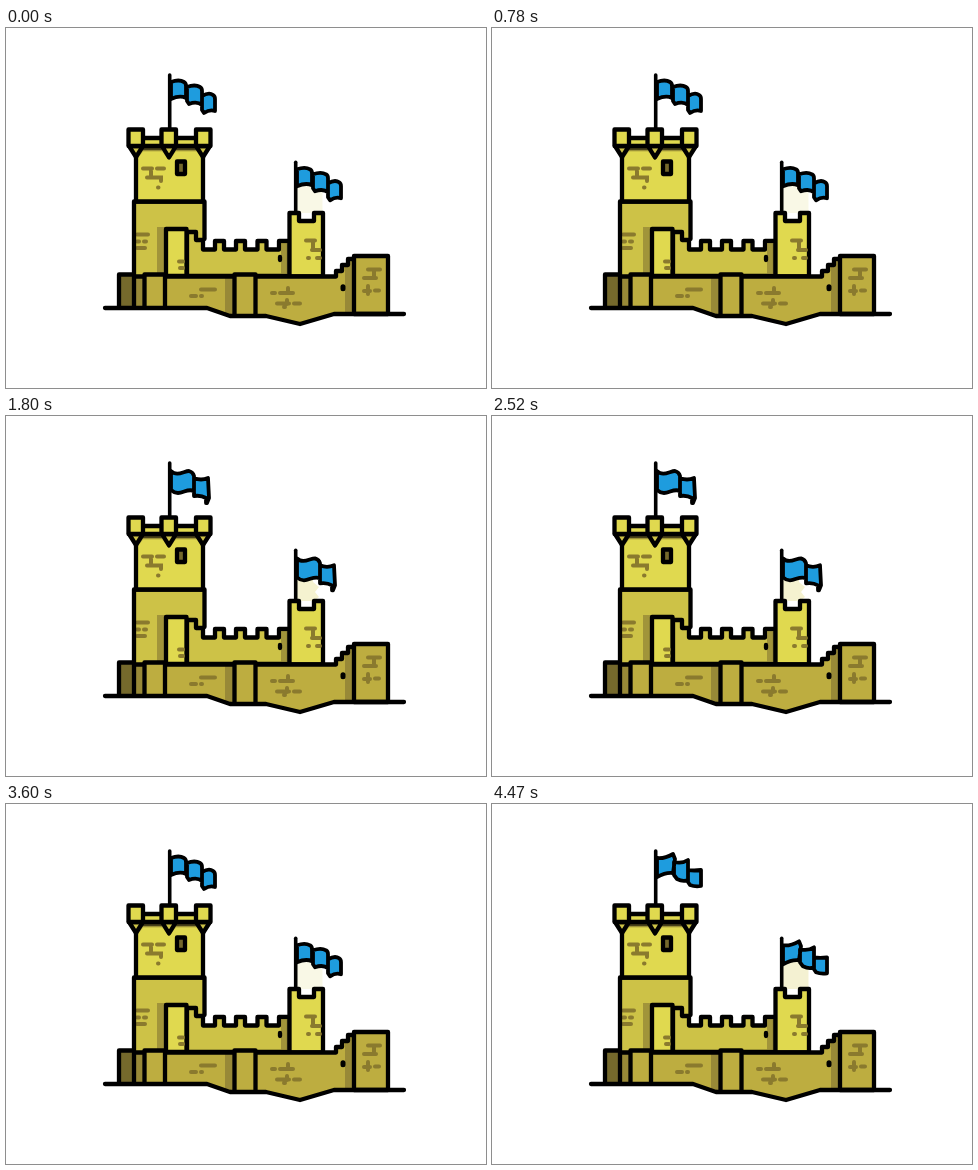
An HTML page for the animation above (4.5 s loop, 480 by 360 pixels).

```html
<!DOCTYPE html>
<html lang="en">
<head>
<meta charset="utf-8">
<title>Castle with waving flags</title>
<style>
  html, body { margin: 0; width: 100%; height: 100%; overflow: hidden; background: #fff; }
  svg { display: block; width: 480px; height: 360px; }
  .line { fill: none; stroke: #000; stroke-width: 4.3; stroke-linejoin: round; stroke-linecap: round; }
  .light { fill: #e0d94f; }
  .mid { fill: #cdc247; }
  .low { fill: #bdad40; }
  .shade { fill: #8f8135; }
  .dark { fill: #75692c; }
  .slit { stroke-width: 5; }
  .pole { stroke-width: 3.6; }
  .brick { fill: none; stroke: #8a7a2e; stroke-width: 4; stroke-linecap: round; }
  .flag { fill: #1e9cde; stroke: #000; stroke-width: 3.8; stroke-linejoin: round; }
</style>
</head>
<body>
<svg viewBox="0 0 480 360">
  <path id="glow"/>

  <!-- flags -->
  <g id="flag">
    <path class="flag" id="cloth"/>
    <path class="line pole" d="M163.700 47V100"/>
  </g>
  <use href="#flag" x="126" y="87.300"/>

  <!-- main tower -->
  <path class="mid" d="M128 174H199V248H128z"/>
  <path class="shade" opacity=".7" d="M151 199H160V248H151z"/>
  <path class="brick" d="M131 206.500H142M131 213.500H133M138 213.500H140M131 220H139"/>
  <path class="line" d="M128 248V173.500H198.500V211"/>
  <path class="line light" d="M130 120V173.500H197V120z"/>
  <path class="shade" opacity=".5" d="M132 120H195V123.500H170L163 132L156 123.500H137L132 130z"/>
  <path class="brick" d="M137 140.500H146M151 140.500H158M145 141V149M141 149.500H155V153M152 159.500H152.500"/>
  <path class="line dark" d="M171 133.500H179V146H171z"/>
  <path class="line light" d="M130 110H197V118H130z"/>
  <path class="line mid" d="M123 118H137L130 129zM156 118H170L163 129.500zM190 118H204L197 129z"/>
  <path class="line light" d="M122.500 101.500H137V118H122.500zM155.500 101.500H170V118H155.500zM190 101.500H204.500V118H190z"/>

  <!-- curtain wall -->
  <path class="line mid" d="M181 248V204H190V212H197V221.500H209V213H218V221.500H230V213H239V221.500H251.500V213H260.500V221.500H273V213H283V248z"/>
  <path class="shade" opacity=".7" d="M275 215H282V246H275z"/>
  <path class="line" d="M274 229V232"/>
  <path class="line light" d="M160 248V201H180.500V248z"/>
  <path class="brick" d="M173 233.500H177M174 240H177"/>

  <!-- small tower -->
  <path class="line light" d="M283.500 248.500V185H293V193H308V185H317V248.500z"/>
  <path class="brick" d="M300 212.500H309M307 213V221M306 222H314M302 230H303M311 230H314"/>

  <!-- lower wall -->
  <path class="low" d="M113 248H330V243H336V237H342V231H348V286H328L294 296L260 288H224L201 280H113z"/>
  <path class="dark" d="M113 247H128V280H113z"/>
  <path class="shade" opacity=".8" d="M128 248H138V280H128zM219 249H228V287L219 285zM339 237L347 232V285H339z"/>
  <path class="line" d="M128 248V279M113 279V246.500H128M128 248.500H330V243H336V237H342V231H348"/>
  <path class="line low" d="M138.500 279V246.500H159V279M228.500 287V246.500H249.500V287"/>
  <path class="line low" d="M348 286V228H382V286z"/>
  <path class="line" d="M99 280H201L224 288H260L294 296L328 286H398"/>
  <path class="line slit" d="M337 258.800V260.800"/>
  <path class="brick" d="M195 261.500H209M185 268H190M195 268H196
    M282 260V265M266 265H269M274 265H287M271 275.500H283M281 272V276M278 279H279M288 275.500H294
    M362 241.500H374M368 242V250M358 250H370M362 258V266M358 263H364M369 262.500H373"/>
</svg>
<script>
  const LOOP = 4500, STEP = 120;

  // Each drawing lists its folds from the free end back to the pole.
  const cloths = [
    "M196 68q7 -4 11 -1q2 1 2 4v12q-5 -2 -11 2l-2 -3z M181 59q8 -3 13 0q2 1 2 4v14q-5 -4 -13 -1l-2 -3z M165 54q8 -3 13 0q2 1 2 4v12q-6 -3 -15 1z",
    "M196 66q6 1 13 0v16q-6 1 -11 -1l-2 -3z M182 58q8 2 14 -2v20q-5 2 -11 -1l-3 -4z M165 54q7 1 16 -4l2 5l-2 14q-7 -1 -16 4z",
    "M200 65q3 2 6 0v17q-3 2 -6 -1z M185 60q8 3 15 0v18q-8 3 -15 -3z M165 54q8 4 18 -2l2 3v17q-10 -1 -20 2z",
    "M188 62q7 3 14 0l1 20l-2 5h-1v-5q-5 -3 -12 -2z M165 55c6 6 13 0 18 0q4 1 5 5v15c-8 -4 -14 7 -23 -1z",
    "M191 64q7 1 13 0v20h-3q-4 -4 -10 -3z M172 56q10 -1 19 4v16q-10 -4 -19 1z M165 54q4 3 7 2v18q-4 2 -7 -1z",
    "M194 66q7 -2 13 1v16q-6 -2 -13 0z M177 57q9 -1 17 4v16q-9 -5 -17 0z M165 53q6 0 12 2v17q-6 -2 -12 1z"
  ];
  const square = "M291 158H316.500V185H291z";
  const notched = "M291 158H307V166L313 171L309 176L313 181L308 185H291z";
  const glows = ["#f9f8e6", "#f4f1d2", "#f5f2d0"];

  const cloth = document.getElementById("cloth");
  const glow = document.getElementById("glow");

  function draw() {
    const i = Math.floor(performance.now() % LOOP / STEP) % cloths.length;
    cloth.setAttribute("d", cloths[i]);
    glow.setAttribute("d", i > 1 && i < 5 ? notched : square);
    glow.setAttribute("fill", glows[Math.min(i, 5 - i)]);
    requestAnimationFrame(draw);
  }
  draw();
</script>
</body>
</html>
```
